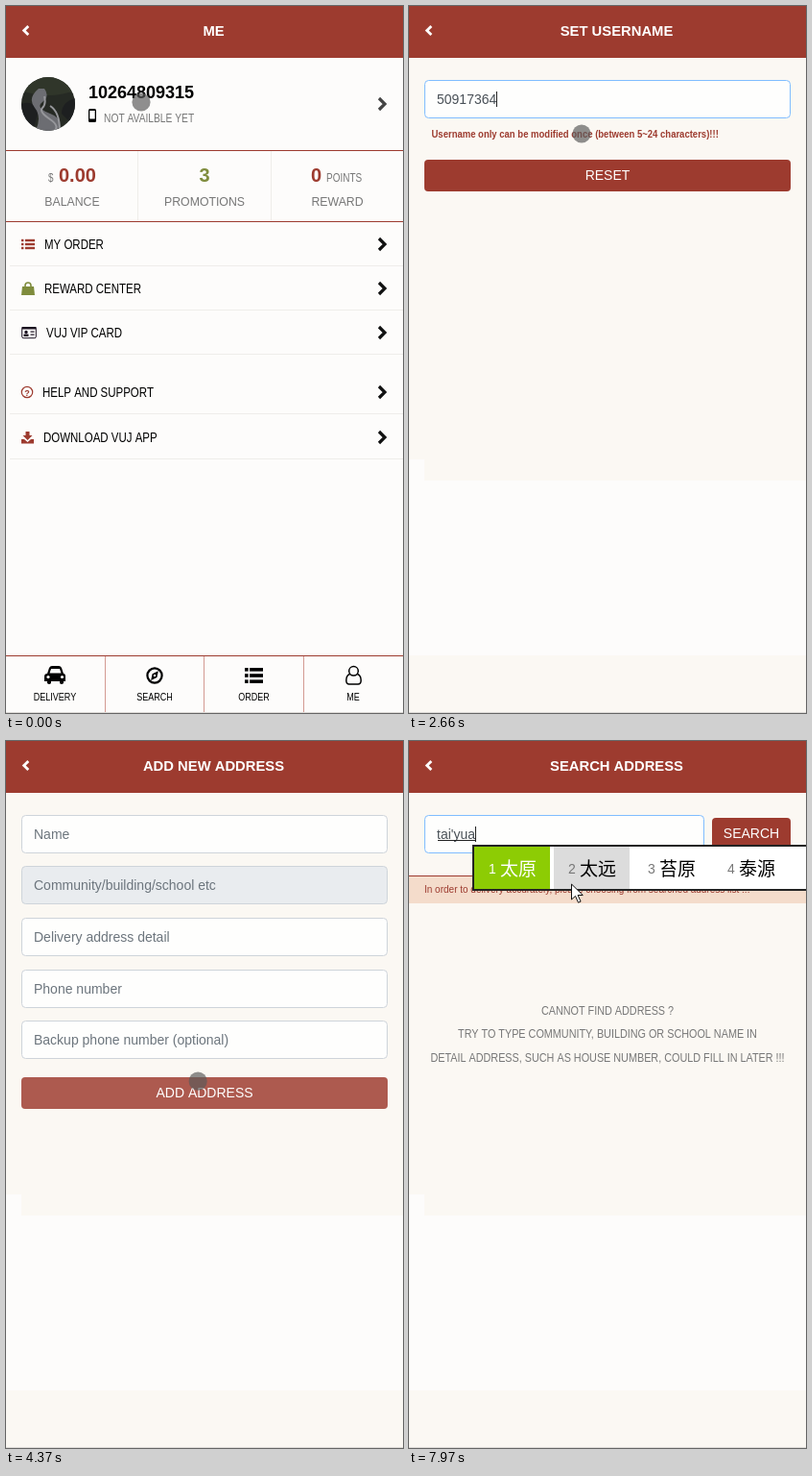
Recreate the animation shown at these times as an HTML page with a canvas. Size 414 by 736 pixels, loop 8000 ms.

```html
<!DOCTYPE html>
<html lang="en">
<head>
<meta charset="utf-8">
<title>Account walkthrough</title>
<style>
html, body { margin: 0; width: 100%; height: 100%; overflow: hidden; background: #fdfcfb; }
canvas { display: block; width: 414px; height: 736px; }
</style>
</head>
<body>
<canvas id="stage" width="414" height="736"></canvas>
<script>
const W = 414, H = 736, LOOP = 8000, FADE = 300, SLIDE = 30;
const RED = '#9d3b2f', GREEN = '#7f8c3d', CREAM = '#fbf8f3', PAPER = '#fdfcfb', LINE = '#efedea', GRAY = '#777', INK = '#232323';
const FONTS = '"Liberation Sans", "Noto Sans CJK SC", sans-serif';
const CONDENSED = 0.82;
const PHONE = '10264809315', NEW_NAME = '50917364';

const screen2d = stage.getContext('2d');
const sheet = new OffscreenCanvas(W, H);
const sheet2d = sheet.getContext('2d');
let g = screen2d;

// Drawing helpers
function rect(x, y, w, h, color) {
  g.fillStyle = color;
  g.fillRect(x, y, w, h);
}

function rounded(x, y, w, h, r, fill, stroke) {
  g.beginPath();
  g.roundRect(x, y, w, h, r);
  if (fill) { g.fillStyle = fill; g.fill(); }
  if (stroke) { g.strokeStyle = stroke; g.lineWidth = 1; g.stroke(); }
}

function shape(d, fill, stroke, width = 1) {
  const path = new Path2D(d);
  if (fill) { g.fillStyle = fill; g.fill(path); }
  if (stroke) { g.strokeStyle = stroke; g.lineWidth = width; g.stroke(path); }
}

function disc(x, y, r, fill, stroke, width = 1) {
  g.beginPath();
  g.arc(x, y, r, 0, 7);
  if (fill) { g.fillStyle = fill; g.fill(); }
  if (stroke) { g.strokeStyle = stroke; g.lineWidth = width; g.stroke(); }
}

function text(str, x, y, { size = 14, bold = false, color = '#000', align = 'left', narrow = false } = {}) {
  g.save();
  g.translate(x, y);
  if (narrow) g.scale(CONDENSED, 1);
  g.font = `${bold ? 'bold ' : ''}${size}px ${FONTS}`;
  g.fillStyle = color;
  g.textAlign = align;
  g.fillText(str, 0, 0);
  g.restore();
}

const narrow = (str, x, y, style) => text(str, x, y, { ...style, narrow: true });

function textWidth(str) {
  g.font = `14px ${FONTS}`;
  return g.measureText(str).width;
}

// Shared parts
const chevron = (y, color = '#111') => shape(`M389 ${y - 6}l6 6-6 6`, null, color, 3.2);

function header(title, x = 216.5) {
  rect(0, 0, W, 54, RED);
  shape('M23.3 21l-4.6 4.5 4.6 4.5', null, '#fff', 2.8);
  text(title, x, 31, { size: 14.8, bold: true, color: '#fff', align: 'center' });
}

function backdrop(title, x) {
  rect(0, 0, W, H, CREAM);
  rect(0, 472, 16, 204, PAPER);
  rect(16, 494, W - 16, 182, PAPER);
  rect(0, 735, W, 1, '#dedbd8');
  header(title, x);
}

function panel(y, h) {
  rect(0, y, W, h, '#fefdfc');
  rect(0, y + h - 1, W, 1, LINE);
}

function button(label, x, y, w, color = RED) {
  rounded(x, y, w, 33, 4, color);
  text(label, x + w / 2, y + 21, { color: '#fff', align: 'center' });
}

function field(x, y, w, { hint = '', value = '', focus = false, composing = false, fill = '#fefefd' }) {
  rounded(x + .5, y + .5, w - 1, 39, 4, fill, focus ? '#80bdff' : '#ced4da');
  text(value || hint, x + 13, y + 25, { color: value ? '#495057' : '#6c757d' });
  const end = x + 13 + textWidth(value);
  if (composing) rect(x + 14, y + 26, end - x - 14, 1, INK);
  if (focus) rect(Math.round(end), y + 12, 1, 16, INK);
}

function photo(x, y) {
  g.save();
  disc(x, y, 28, '#262a24');
  g.clip();
  g.translate(x, y);
  shape('M-28-28h56v14q-28 10-56 0z', '#30362a');
  shape('M-28 0q12-4 18 6l-6 24h-14zM28-6q-14 4-14 16l14 14z', '#1d1f20');
  shape('M-4-16q6 8-2 14t8 12 6 20h-22q8-16 0-26t4-20z', '#6c6d72');
  shape('M-4-8q2 8-2 12t8 12 2 14M2 2q10 6 10 26', null, '#96979b', 2);
  g.restore();
}

function listIcon(x, y, w, gap, size, color) {
  for (let i = -1; i <= 1; i++) {
    rect(x, y + i * gap - size / 2, size, size, color);
    rect(x + size + 1.5, y + i * gap - size / 2, w - size - 1.5, size, color);
  }
}

// Pages
function mePage() {
  rect(0, 0, W, H, PAPER);
  header('ME');
  photo(44, 102);
  text(PHONE, 86, 96, { size: 18, bold: true });
  rounded(86, 107, 8, 14, 1.5, '#000');
  rect(87.3, 109, 5.4, 8.5, '#fff');
  narrow('NOT AVAILBLE YET', 102, 121, { size: 12.5, color: GRAY });
  chevron(102, '#444');
  rect(0, 150, W, 1, RED);
  rect(0, 224, W, 1, RED);
  rect(137, 151, 1, 73, LINE);
  rect(276, 151, 1, 73, LINE);

  const big = { size: 20, bold: true };
  narrow('$', 44, 183, { size: 12, color: GRAY });
  text('0.00', 55, 183, { ...big, color: RED });
  text('3', 207, 183, { ...big, color: GREEN, align: 'center' });
  text('0', 318, 183, { ...big, color: RED });
  narrow('POINTS', 334, 183, { size: 12.2, color: GRAY });
  [['BALANCE', 69], ['PROMOTIONS', 207], ['REWARD', 345.5]].forEach(([s, x]) =>
    text(s, x, 207.8, { size: 12.3, color: GRAY, align: 'center' }));

  [['MY ORDER', 40, 248], ['REWARD CENTER', 40, 294], ['VUJ VIP CARD', 42, 340],
   ['HELP AND SUPPORT', 38, 402], ['DOWNLOAD VUJ APP', 39, 449]].forEach(([s, x, y]) => {
    narrow(s, x, y + 5);
    chevron(y);
    rect(4, y + 22, W - 4, 1, LINE);
  });
  listIcon(16, 248, 14, 4, 2.4, RED);
  shape('M17 292h12l1 9h-14z', GREEN);
  shape('M20 295v-4q0-3 3-3t3 3v4', null, GREEN, 1.6);
  rounded(16.7, 334.7, 14.6, 11, 1.5, null, '#1b1020');
  rect(16.5, 334, 15, 2.5, '#1b1020');
  disc(21, 339.5, 1.7, '#1b1020');
  rect(18.5, 341.5, 5, 2.5, '#1b1020');
  rect(25.5, 338.5, 4, 1.2, '#1b1020');
  rect(25.5, 341.5, 4, 1.2, '#1b1020');
  disc(22, 402, 5.7, null, RED, 1.2);
  text('?', 22, 405.5, { size: 9, bold: true, color: RED, align: 'center' });
  shape('M20.5 443h4v4h3l-5 5-5-5h3zM16 451h3l3.5 3 3.5-3h3v4.5h-13z', RED);

  rect(0, 676, W, 1, RED);
  [103, 206, 310].forEach(x => rect(x, 677, 1, 58, '#d39a92'));
  rect(0, 735, W, 1, '#dedbd8');
  [['DELIVERY', 51], ['SEARCH', 155], ['ORDER', 258.5], ['ME', 362]].forEach(([s, x]) =>
    narrow(s, x, 723, { size: 11, align: 'center' }));
  shape('M43 695l2-6q1-2 3-2h7q2 0 3 2l2 6q2 0 2 3v5h-2v2q-2 2-4 0v-2h-9v2q-2 2-4 0v-2h-3v-5q0-3 3-3z', '#000');
  shape('M45.5 694.5l1.5-4.5h9l1.5 4.5z', PAPER);
  disc(44, 698.5, 1.6, PAPER);
  disc(58.5, 698.5, 1.6, PAPER);
  disc(155, 697, 7.6, null, '#000', 2.2);
  shape('M158.8 692.2l-1.4 6.8-6.2 3 1.4-6.8z', '#000');
  disc(155, 697, 1.2, PAPER);
  listIcon(249, 697, 19, 6.2, 3.6, '#000');
  disc(362.5, 692.3, 4.8, null, '#000', 1.5);
  shape('M358.5 695.5q-3.7 1.5-3.7 6.5 0 4 3.2 4h9q3.2 0 3.2-4 0-5-3.7-6.5', null, '#000', 1.5);
}

function accountPage(t) {
  backdrop('ACCOUNT DETAIL');
  [[70, 92], [162, 46], [207, 47], [300, 47], [392, 47]].forEach(([y, h]) => panel(y, h));
  rect(0, 207, W, 1, LINE);
  narrow('PROFILE IMAGE', 16, 120);
  photo(343, 115);
  narrow('USERNAME', 16, 189);
  narrow(t > 2600 ? NEW_NAME : PHONE, 372, 189, { align: 'right' });
  narrow('SHIPPING ADDRESS', 16, 236);
  narrow('BIND PHONE', 16, 282, { bold: true });
  rounded(16.6, 318.6, 4.4, 8.6, 1, null, RED);
  narrow('PHONE NUMBER', 32, 328);
  narrow('SECURITY SETTINGS', 16, 374, { bold: true });
  narrow('LOGIN PASSWORD', 16, 420);
  narrow('CHANGE', 372, 420, { align: 'right', color: '#333' });
  [115, 184, 231, 323, 415].forEach(y => chevron(y, INK));
  button('LOGOUT', 16, 461, 382);
}

const keyTimes = [1090, 1230, 1460, 1620, 1850, 2075, 2300, 2520];

function usernamePage(t) {
  backdrop('SET USERNAME');
  const count = keyTimes.filter(k => k <= t).length;
  field(16, 77, 382, { hint: 'Username', value: NEW_NAME.slice(0, count), focus: count > 0 });
  narrow('Username only can be modified once (between 5~24 characters)!!!', 23.5, 137,
    { size: 11.6, bold: true, color: RED });
  button('RESET', 16, 160, 382);
}

function addressesPage() {
  backdrop('EDIT ADDRESS', 205);
  narrow('EDIT', 398, 30, { size: 12.3, color: '#fff', align: 'right' });
  [['517號', PHONE], ['461', '10482069317, 10570318264'], ['739', '10693174058'],
   ['云岭滋味青禾归雁阁', '10925817436'], ['石榴园西餐厅云溪青柳银杏店', '10718402965']].forEach(([name, phones], i) => {
    const y = Math.round(70 + i * 60.2);
    panel(y, 60);
    text(name, 16, y + 25, { size: 12.6, bold: true });
    text(phones, 20, y + 46, { size: 12, color: GRAY });
  });
  panel(382, 46);
  narrow('ADD NEW ADDRESS', 16, 410);
  chevron(405);
}

// Input method steps: time, typed letters, candidate words
const composition = [
  [4860, 'x', ''], [4940, 'x', '想 下 小 先 新 写'], [5090, "x'e", '邪恶 险恶 限额 凶恶'],
  [5250, "x'e'd", '邪恶的 邪恶 险恶 限额'], [5700, "x'e'd'e", '邪恶的 邪恶 险恶 限额'], [5840, '邪恶的', ''],
  [7390, 't', ''], [7470, 't', '他 她 太 听 天 同'], [7610, 'ta', '他 她 它 塔 踏 塌'],
  [7682, 'tai', '太 台 态 泰 抬 胎'], [7754, "tai'y", '太阳 太远 抬眼 泰语'],
  [7826, "tai'yu", '太原 太远 泰语 态于'], [7898, "tai'yua", '太原 太远 苔原 泰源']
];

function composed(t, since) {
  const step = composition.findLast(([at]) => at <= t && at >= since);
  return step ? { value: step[1], words: step[2], composing: !/[^a-z']/.test(step[1]) } : { value: '', words: '' };
}

function addAddressPage(t) {
  backdrop('ADD NEW ADDRESS');
  field(16, 77, 382, { hint: 'Name', ...composed(t, 4800), focus: t >= 4600 });
  field(16, 130, 382, { hint: 'Community/building/school etc', fill: '#e9ecef' });
  field(16, 184, 382, { hint: 'Delivery address detail' });
  field(16, 238, 382, { hint: 'Phone number' });
  field(16, 291, 382, { hint: 'Backup phone number (optional)' });
  button('ADD ADDRESS', 16, 350, 382, '#ad5a4f');
}

function searchPage(t) {
  backdrop('SEARCH ADDRESS');
  field(16, 77, 292, { hint: 'Community/building/school etc', ...composed(t, 7000), focus: t >= 6860 });
  button('SEARCH', 316, 80, 82);
  rect(0, 140, W, 29, '#f4dccb');
  rect(0, 140, W, 1, RED);
  text('In order to delivery accurately, please choosing from searched address list !!!', 16, 158,
    { size: 10, color: RED });
  ['CANNOT FIND ADDRESS ?', 'TRY TO TYPE COMMUNITY, BUILDING OR SCHOOL NAME IN',
   'DETAIL ADDRESS, SUCH AS HOUSE NUMBER, COULD FILL IN LATER !!!'].forEach((s, i) =>
    narrow(s, 207, 285 + i * 24.4, { size: 13.2, color: GRAY, align: 'center' }));
}

// Timeline
const scenes = [
  { at: -FADE, page: mePage },
  { at: 140, page: accountPage },
  { at: 765, page: usernamePage },
  { at: 2880, page: accountPage, back: true },
  { at: 3490, page: addressesPage },
  { at: 4075, page: addAddressPage },
  { at: 6100, page: searchPage }
];

const pointerPath = [
  [0, 141, 100], [480, 141, 100], [720, 217, 189], [1200, 217, 189], [1230, 180, 133], [2670, 180, 133],
  [2830, 200, 176], [3180, 200, 176], [3420, 223, 231], [3720, 223, 231], [3920, 223, 403], [4290, 223, 403],
  [4600, 88, 114], [4930, 88, 114], [5090, 85, 145], [5250, 83, 150], [5440, 83, 150], [5470, 90, 168],
  [5830, 90, 168], [6000, 117, 152], [6580, 117, 152], [6800, 150, 108], [7600, 150, 108], [7960, 169, 149],
  [LOOP, 169, 149]
];

const presses = [[150, 300], [720, 1000], [2830, 3000], [3440, 3600], [4050, 4200], [4600, 4700], [6040, 6480], [6820, 7000]];

// CSS "ease" curve, cubic-bezier(.25, .1, .25, 1)
function ease(x) {
  if (x >= 1) return 1;
  let lo = 0, hi = 1, s = .5;
  for (let i = 0; i < 16; i++) {
    s = (lo + hi) / 2;
    if (.75 * s * (1 - s) + s ** 3 < x) lo = s; else hi = s;
  }
  return .3 * s * (1 - s) ** 2 + 3 * s * s * (1 - s) + s ** 3;
}

function pointerAt(t) {
  const i = pointerPath.findIndex(([at]) => at > t);
  const [t0, x0, y0] = pointerPath[i - 1], [t1, x1, y1] = pointerPath[i];
  const k = (t - t0) / (t1 - t0), s = k * k * (3 - 2 * k);
  return { x: x0 + (x1 - x0) * s, y: y0 + (y1 - y0) * s };
}

function overlay(page, t, offset, alpha) {
  g = sheet2d;
  page(t);
  g = screen2d;
  g.globalAlpha = alpha;
  g.drawImage(sheet, offset, 0);
  g.globalAlpha = 1;
}

function candidates(words, value, pointer) {
  const left = Math.round(29 + textWidth(value) - 3.3);
  rect(left, 108, W, 48, INK);
  rect(left + 2, 110, W, 44, '#fff');
  let x = left + 2;
  words.split(' ').forEach((word, i) => {
    const w = 42 + 19 * word.length, first = i === 0;
    const hover = pointer.x >= x && pointer.x < x + w;
    if (first) rect(x, 110, w - 1, 44, hover ? '#a0e614' : '#8dcc04');
    else if (hover) rect(x, 110, w - 1, 44, '#dcdcdc');
    text(i + 1, x + 15, 138, { color: first ? '#fff' : GRAY });
    text(word, x + 27, 139.5, { size: 19, color: first ? '#fff' : '#000' });
    x += w + 3;
  });
}

function drawPointer({ x, y }, t, overPopup) {
  if (overPopup) {
    g.save();
    g.translate(x + .5, y);
    shape('M0 0v16l4-3.6 3 6.8 2.6-1.1-3-6.6h5.2z', '#fff', '#111');
    g.restore();
    return;
  }
  const pressed = presses.some(([a, b]) => t >= a && t < b);
  disc(x, y, 9.6, pressed ? 'rgba(85,75,73,.72)' : 'rgba(90,90,90,.68)', pressed && '#fff', 1.3);
}

function frame(now) {
  const t = now % LOOP;
  const i = scenes.findLastIndex(s => s.at <= t);
  const { at, page, back } = scenes[i];
  const p = ease((t - at) / FADE);
  if (p === 1) page(t);
  else if (back) {
    page(t);
    overlay(scenes[i - 1].page, t, SLIDE * p, 1 - p);
  } else {
    scenes[i - 1].page(t);
    overlay(page, t, SLIDE * (1 - p), p);
  }
  const pointer = pointerAt(t), { words, value } = composed(t, 0);
  if (words) candidates(words, value, pointer);
  drawPointer(pointer, t, words && pointer.y > 108 && pointer.y < 156);
  requestAnimationFrame(frame);
}
requestAnimationFrame(frame);
</script>
</body>
</html>
```
